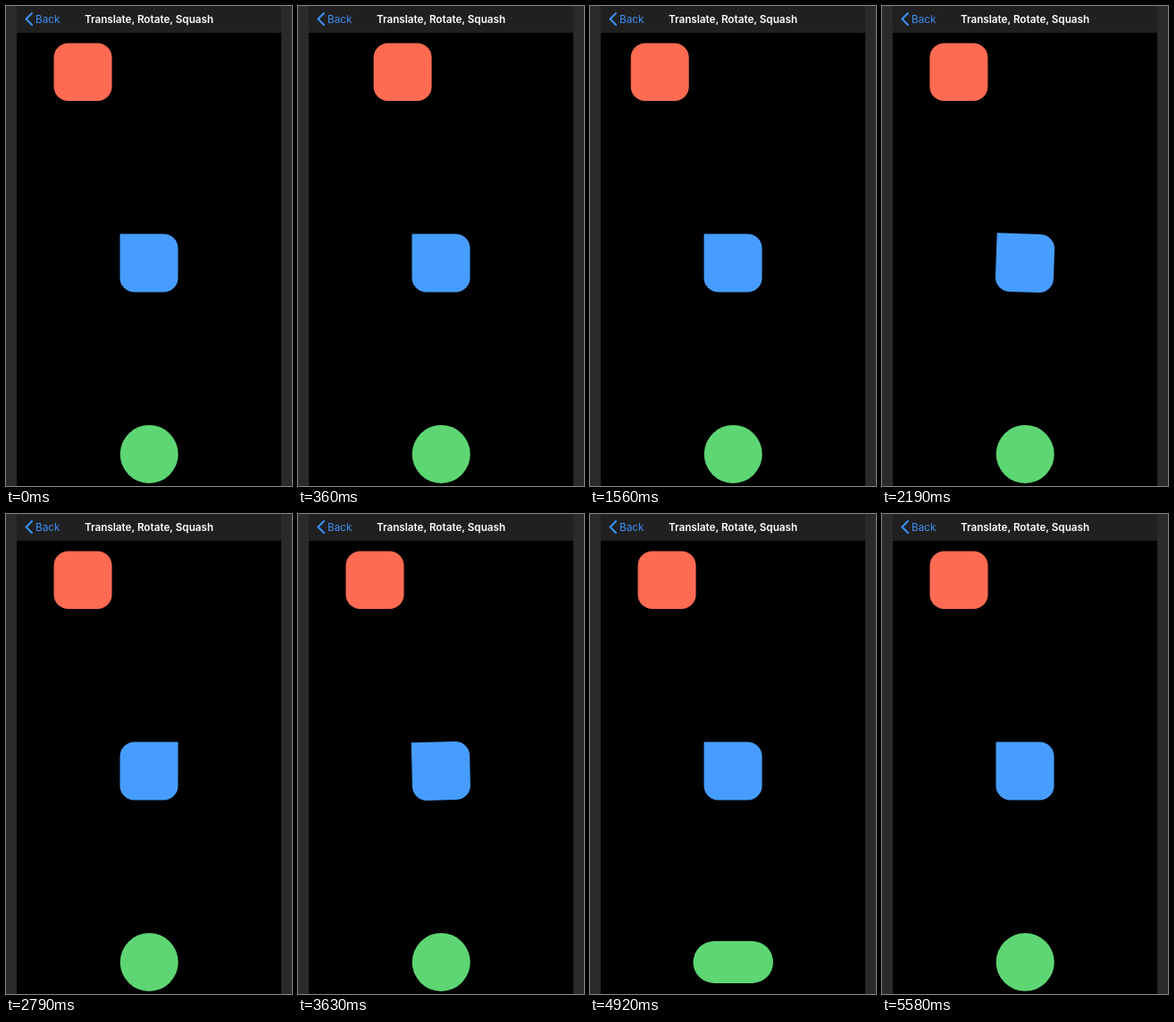
These frames come from a looping animation (320x536 px, 5610 ms). An HTML page:

```html
<!DOCTYPE html>
<html lang="en">
<head>
<meta charset="utf-8">
<title>Translate, Rotate, Squash</title>
<style>
  html, body { margin: 0; width: 100%; height: 100%; overflow: hidden; background: #000; }
  svg { display: block; width: 100vw; height: 100vh; }
  text { font-family: Inter, "Liberation Sans", sans-serif; font-size: 11.7px; }
</style>
</head>
<body>
<svg viewBox="0 0 320 536">
  <rect width="320" height="536" fill="#2a2a2a"/>
  <rect x="12" width="296" height="536" fill="#000"/>
  <rect x="12" width="296" height="30" fill="#202021"/>
  <path d="M29 8 L22.5 14.5 L29 21" fill="none" stroke="#3c8ff5" stroke-width="2.1" stroke-linecap="round" stroke-linejoin="round"/>
  <text x="33" y="18.7" fill="#3c8ff5">Back</text>
  <text x="160" y="18.7" fill="#fff" font-weight="600" text-anchor="middle">Translate, Rotate, Squash</text>
  <rect id="slider" x="53.5" y="41.5" width="65" height="64.5" rx="16" fill="#ff6b52"/>
  <path id="spinner" d="M-32.5 -32.5 H16.5 A16 16 0 0 1 32.5 -16.5 V16.5 A16 16 0 0 1 16.5 32.5 H-16.5 A16 16 0 0 1 -32.5 16.5 Z" fill="#479dff"/>
  <rect id="squasher" fill="#5dd673"/>
</svg>
<script>
  const LOOP = 5610;
  const DAMPING = 0.4;
  const HALF_PERIOD = 170;
  const [slider, spinner, squasher] =
    ["slider", "spinner", "squasher"].map(id => document.getElementById(id));

  // Step response of an underdamped spring, from 0 to 1.
  function spring(t) {
    if (t <= 0) return 0;
    const ratio = DAMPING / Math.sqrt(1 - DAMPING ** 2);
    const phase = Math.PI * t / HALF_PERIOD;
    return 1 - Math.exp(-ratio * phase) * (Math.cos(phase) + ratio * Math.sin(phase));
  }

  const thereAndBack = (t, go, back) => spring(t - go) - spring(t - back);

  function render(t) {
    const slide = thereAndBack(t, 325, 1305);
    const spin = thereAndBack(t, 2180, 3130);
    const squash = thereAndBack(t, 3890, 4920);

    slider.setAttribute("transform", `translate(${148 * slide} 0)`);
    spinner.setAttribute("transform", `translate(160 287) rotate(${90 * spin})`);

    const width = 65 + 24.5 * squash;
    const height = 65 - 18 * squash;
    const box = {
      x: 160.2 - width / 2, y: 500.4 - height / 2,
      width, height, rx: Math.min(width, height) / 2
    };
    for (const name in box) squasher.setAttribute(name, box[name]);
  }

  const start = performance.now();
  function tick() {
    render((performance.now() - start) % LOOP);
    requestAnimationFrame(tick);
  }
  render(0);
  requestAnimationFrame(tick);
</script>
</body>
</html>
```
